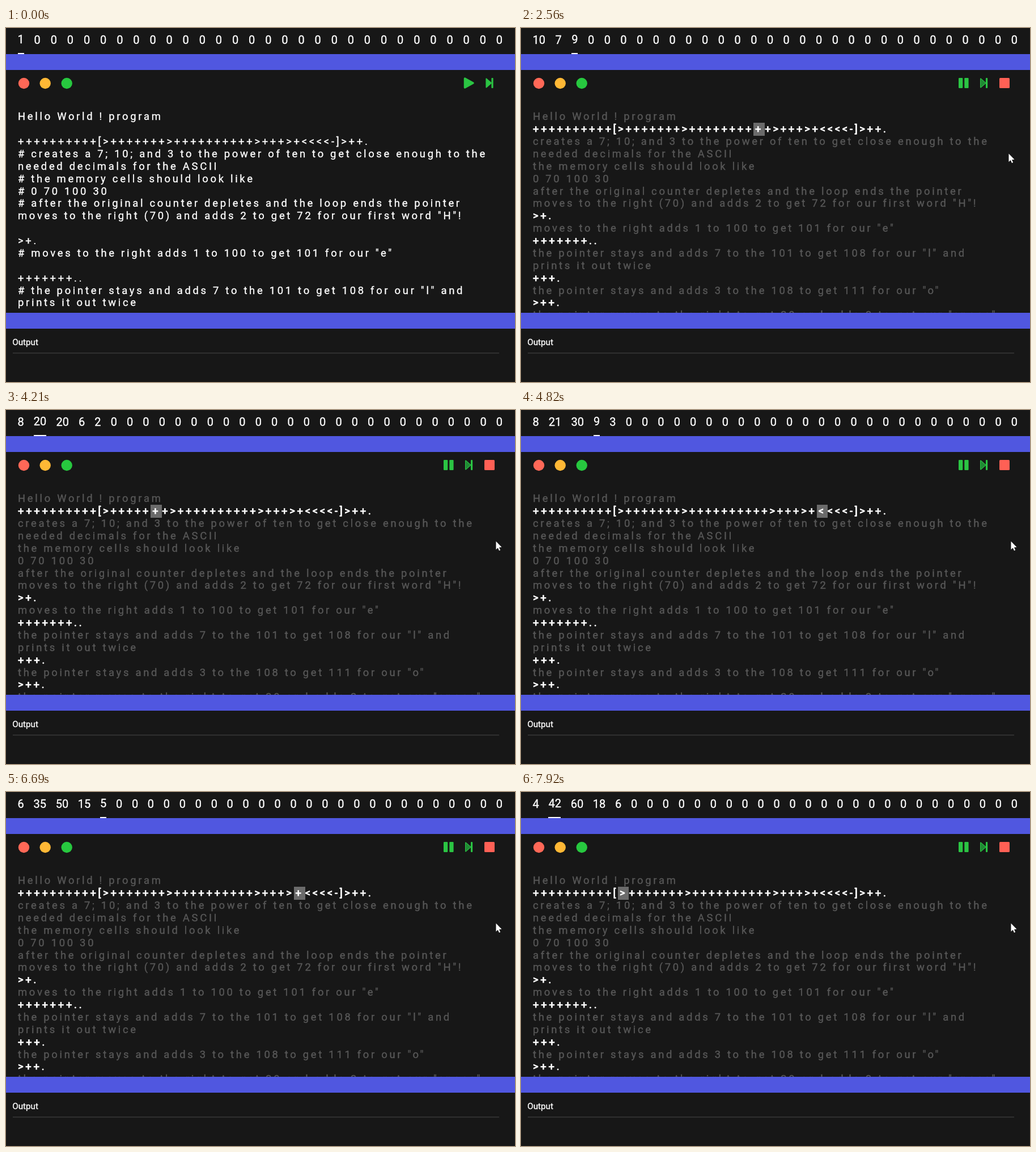
Animation of 898x624 px, one loop 7990 ms. Source, as an HTML page with a canvas:

```html
<!DOCTYPE html>
<html lang="en">
<head>
<meta charset="utf-8">
<title>Hello World interpreter</title>
<style>
html, body { margin: 0; width: 100%; height: 100%; overflow: hidden; background: #171717; }
canvas { display: block; }
</style>
</head>
<body>
<canvas id="stage" width="898" height="624"></canvas>
<script>
const ctx = document.getElementById('stage').getContext('2d');
const LOOP = 7990, RUN_AT = 1740;
const SIZE = 18.46, SPACING = SIZE * 0.2, LEFT = 21, FIRST_LINE = 162.4, LINE = 21.87, PAD = 3;
const GREEN = '#2bc443', RED = '#ff6055', BACK = '#171717', BLUE = '#5057e0';
const WHITE = '#fff', DIM = '#585858';
const REGULAR = 0.35, BOLD = 0.85;
const PROGRAM = '++++++++++[>+++++++>++++++++++>+++>+<<<<-]>++.';

const sourceLines = [
  'Hello World ! program', '', PROGRAM,
  '# creates a 7; 10; and 3 to the power of ten to get close enough to the',
  'needed decimals for the ASCII',
  '# the memory cells should look like',
  '# 0 70 100 30',
  '# after the original counter depletes and the loop ends the pointer',
  'moves to the right (70) and adds 2 to get 72 for our first word "H"!',
  '', '>+.',
  '# moves to the right adds 1 to 100 to get 101 for our "e"',
  '', '+++++++..',
  '# the pointer stays and adds 7 to the 101 to get 108 for our "l" and',
  'prints it out twice'
];
// While running, blank lines and comment marks are dropped.
const runLines = sourceLines.filter(Boolean).map(s => s.replace(/^# /, '')).concat([
  '+++.',
  'the pointer stays and adds 3 to the 108 to get 111 for our "o"',
  '>++.',
  'the pointer moves to the right to get 30 and adds 2 to get our "space"'
]);

// Screen refreshes: twelve per span.
const spans = [[2230, 2960], [3030, 3800], [3860, 4600], [4680, 5440],
  [5510, 6270], [6340, 7080], [7150, 7920]];
// Refresh number -> last executed instruction.
const pace = [[-7, 2], [5, 28], [20, 60], [25, 71], [38, 98], [39, 101],
  [65, 159], [67, 163], [82, 195], [83, 197]];
// Pointer: time, x, y, shape ('' hides it).
const hops = [[0, 0, 0, ''], [660, 798, 511, 'arrow'], [750, 0, 0, ''],
  [890, 798, 90, 'arrow'], [960, 812, 89, 'hand'], [1040, 838, 90, 'arrow'],
  [1120, 852, 88, 'hand'], [1190, 863, 80, 'arrow'], [1270, 865, 76, 'arrow'],
  [1410, 846, 88, 'hand'], [1480, 815, 89, 'hand']];
const glide = [[1950, 815, 89], [2160, 830, 110], [2330, 850, 180], [2560, 860, 221],
  [2760, 879, 229], [2960, 879, 229], [3100, 864, 231]];

function lerpKeys(keys, at, col) {
  if (at <= keys[0][0]) return keys[0][col];
  for (let i = 1; i < keys.length; i++) {
    const a = keys[i - 1], b = keys[i];
    if (at <= b[0]) return a[col] + (b[col] - a[col]) * (at - a[0]) / (b[0] - a[0]);
  }
  return keys[keys.length - 1][col];
}

function refreshAt(t) {
  if (t < spans[0][0]) return -7 + Math.floor((t - RUN_AT) / 70);
  const i = spans.findLastIndex(s => t >= s[0]), [from, to] = spans[i];
  return 12 * i + Math.min(11, Math.floor((t - from) / (to - from) * 11 + 0.2));
}

function execute(last) {
  const cells = Array(30).fill(0);
  let at = 0, ip = -1;
  for (let n = 0; n <= last; n++) {
    const op = PROGRAM[++ip];
    if (op === '+') cells[at]++;
    else if (op === '-') cells[at]--;
    else if (op === '>') at++;
    else if (op === '<') at--;
    else if (op === ']' && cells[at]) ip = PROGRAM.indexOf('[');
  }
  return { cells, at, ip };
}

function rect(x, y, w, h, color) {
  ctx.fillStyle = color;
  ctx.fillRect(x, y, w, h);
}

function setFont(size, spacing = 0) {
  ctx.font = size + 'px Roboto, sans-serif';
  ctx.letterSpacing = spacing + 'px';
}

// A thin outline sets the weight without changing the advances.
function text(s, x, y, color, weight = REGULAR) {
  ctx.fillStyle = ctx.strokeStyle = color;
  ctx.lineWidth = weight;
  ctx.lineJoin = 'round';
  ctx.fillText(s, x, y);
  ctx.strokeText(s, x, y);
  return x + ctx.measureText(s).width;
}

function drawCells(cells, at) {
  setFont(20);
  const from = 20.5, to = 876, digit = ctx.measureText('0').width;
  const gap = (to - from - cells.join('').length * digit) / (cells.length - 1);
  let x = from;
  cells.forEach((value, i) => {
    const w = String(value).length * digit;
    text(String(value), x, i === at ? 27 : 28, WHITE);
    if (i === at) rect(Math.round(x), 44, Math.round(w), 2, WHITE);
    x += w + gap;
  });
}

function drawCode(lines, running, ip) {
  ctx.save();
  ctx.beginPath();
  ctx.rect(0, 74, 898, 428);
  ctx.clip();
  setFont(SIZE, SPACING);
  lines.forEach((line, i) => {
    const y = Math.round(FIRST_LINE + i * LINE);
    if (!running || !/^[-+<>.[\]]+$/.test(line)) {
      text(line, LEFT, y, running ? DIM : WHITE);
    } else if (line === PROGRAM) {
      const x = text(line.slice(0, ip), LEFT, y, WHITE, BOLD);
      const w = ctx.measureText(line[ip]).width + 2 * PAD;
      rect(Math.round(x), 167, Math.round(w), 23, '#6b6b6b');
      text(line[ip], x + PAD, y, WHITE, BOLD);
      text(line.slice(ip + 1), x + w, y, WHITE, BOLD);
    } else text(line, LEFT, y, WHITE, BOLD);
  });
  ctx.restore();
}

function disc(x, color) {
  ctx.fillStyle = color;
  ctx.beginPath();
  ctx.arc(x, 97.5, 9.7, 0, 7);
  ctx.fill();
}

function polygon(points, fill, stroke, width) {
  ctx.beginPath();
  points.forEach(([x, y]) => ctx.lineTo(x, y));
  ctx.closePath();
  ctx.lineJoin = 'round';
  ctx.lineWidth = width;
  ctx.strokeStyle = stroke;
  ctx.fillStyle = fill;
  ctx.stroke();
  ctx.fill();
}

function box(x, y, w, h, r, color) {
  ctx.fillStyle = color;
  ctx.beginPath();
  ctx.roundRect(x, y, w, h, r);
  ctx.fill();
}

function stepIcon(x, color) {
  polygon([[x + 1, 89.5], [x + 1, 104.5], [x + 9.5, 97]], color, GREEN, 2);
  box(x + 10, 88, 3.2, 18, 1, GREEN);
}

function drawIcons(running) {
  disc(31.5, '#ff6857');
  disc(69.2, '#ffb835');
  disc(107.2, '#27c83f');
  if (running) {
    box(772, 88, 7.3, 18, 1.2, GREEN);
    box(782.3, 88, 7.3, 18, 1.2, GREEN);
    stepIcon(810, '#1f8a34');
    box(844, 88, 18, 18, 1.5, RED);
  } else {
    polygon([[809.5, 89], [809.5, 105], [824, 97]], GREEN, GREEN, 3.5);
    stepIcon(846.4, GREEN);
  }
}

function drawPointer(x, y, shape) {
  ctx.save();
  ctx.translate(x, y);
  if (shape === 'arrow') {
    polygon([[0.5, 0.5], [0.5, 15], [3.8, 12], [6, 17], [8.2, 16], [6, 11.2], [10.5, 10.8]],
      WHITE, '#111', 1);
  } else {
    const hand = new Path2D();
    hand.roundRect(-2, 0, 3.6, 15, 1.8);
    hand.roundRect(1.2, 5.5, 3, 9, 1.5);
    hand.roundRect(4, 6.5, 3, 9, 1.5);
    hand.roundRect(6, 7.5, 2.6, 9, 1.3);
    hand.roundRect(-3, 10, 11.4, 10.5, 3.5);
    hand.moveTo(-6, 10.5);
    hand.lineTo(-4, 10);
    hand.lineTo(-1, 13);
    hand.lineTo(-1, 18);
    hand.closePath();
    ctx.lineWidth = 2;
    ctx.lineJoin = 'round';
    ctx.strokeStyle = '#111';
    ctx.stroke(hand);
    ctx.fillStyle = WHITE;
    ctx.fill(hand);
    ctx.strokeStyle = '#333';
    ctx.lineWidth = 0.8;
    ctx.beginPath();
    for (const fx of [1.4, 4.1, 6.6]) {
      ctx.moveTo(fx, 7.5);
      ctx.lineTo(fx, 11.5);
    }
    ctx.stroke();
  }
  ctx.restore();
}

function drawCursor(t) {
  if (t >= 1950) {
    const x = lerpKeys(glide, t, 1), y = lerpKeys(glide, t, 2);
    drawPointer(Math.round(x), Math.round(y), t < 2020 ? 'hand' : 'arrow');
    return;
  }
  const [, x, y, shape] = hops.findLast(h => t >= h[0]);
  if (shape) drawPointer(x, y, shape);
}

function draw(t) {
  const running = t >= RUN_AT;
  const state = running
    ? execute(Math.floor(lerpKeys(pace, refreshAt(t), 1) + 0.001))
    : { cells: [1, ...Array(29).fill(0)], at: 0, ip: 0 };
  rect(0, 0, 898, 624, BACK);
  drawCells(state.cells, state.at);
  rect(0, 46, 898, 28, BLUE);
  drawCode(running ? runLines : sourceLines, running, state.ip);
  rect(0, 502, 898, 28, BLUE);
  drawIcons(running);
  setFont(15.2);
  text('Output', 11.3, 558.5, WHITE);
  rect(12, 572, 858, 2, '#303030');
  drawCursor(t);
}

const start = performance.now();
function tick() {
  draw((performance.now() - start) % LOOP);
  requestAnimationFrame(tick);
}
tick();
</script>
</body>
</html>
```
